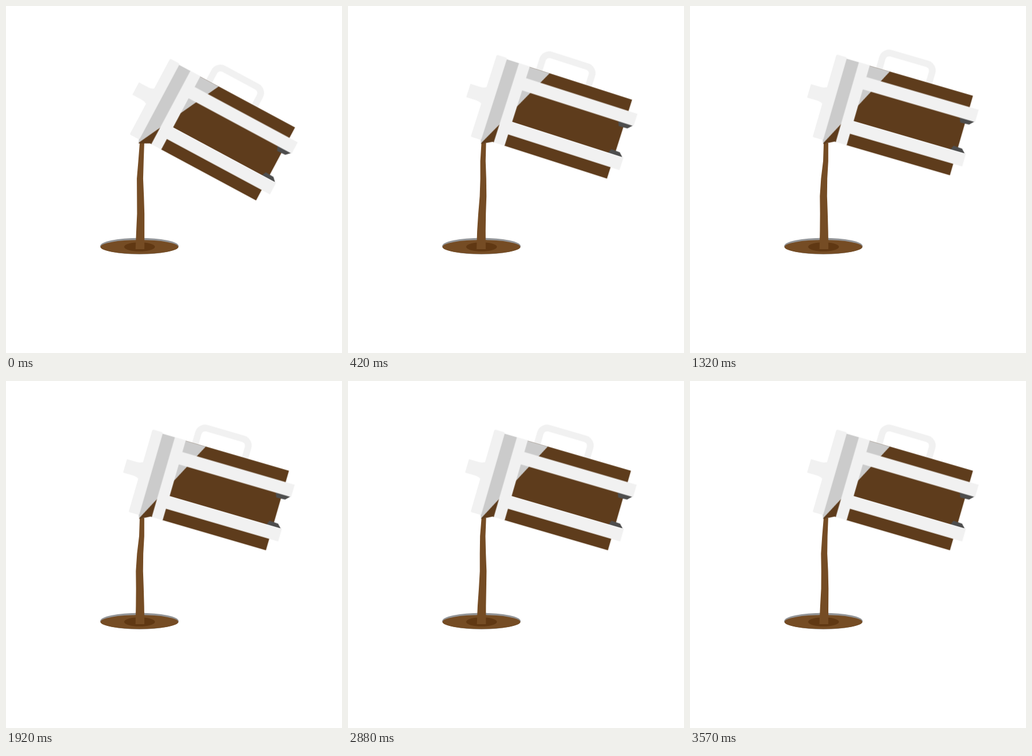
Write an HTML page without scripts that moves like this. It is 578 px wide and 595 px high and loops after 3.6 s.

```html
<!DOCTYPE html>
<html lang="en">
<head>
<meta charset="utf-8">
<title>Pouring coffee</title>
<style>
  @property --phase { syntax: '<angle>'; inherits: true; initial-value: 0deg; }

  html, body { margin: 0; width: 100%; height: 100%; overflow: hidden; background: #fff; }
  svg { display: block; width: 578px; height: 595px; }

  .light { fill: #f1f1f1; }
  .glass { fill: #cbcbcb; }
  .coffee { fill: #5e3c1c; }
  .feet { fill: #4d4d4d; }
  .handle { fill: none; stroke: #f1f1f1; stroke-width: 11.5; }

  .press { transform: translate(233px, 231px) rotate(16.2deg); animation: tilt 3.6s linear infinite; }
  @keyframes tilt {
    0% { transform: translate(233px, 231px) rotate(28.2deg); }
    13.4%, 100% { transform: translate(233px, 231px) rotate(16.2deg); }
  }

  /* A ripple runs down the stream; each height lags the one above. */
  .stream {
    --a: calc(cos(var(--phase) + 138deg) * -.3px);
    --b: calc(cos(var(--phase) + 54deg) * -1.2px);
    --c: calc(cos(var(--phase) - 27deg) * -1.6px);
    --d: calc(cos(var(--phase) - 99deg) * -1.8px);
    --e: calc(cos(var(--phase) - 156deg) * -1.7px);
    --f: calc(cos(var(--phase) - 192deg) * -1.3px);
    --g: calc(cos(var(--phase) - 216deg) * -1px);
    fill: #754c24;
    clip-path: polygon(
      calc(229.8px + var(--a)) 235px,
      calc(228.3px + var(--b)) 266px,
      calc(226.5px + var(--c)) 296px,
      calc(225px + var(--d)) 326px,
      calc(223.9px + var(--e)) 356px,
      calc(222.8px + var(--f)) 386px,
      calc(222px + var(--g)) 417px,
      calc(237.5px + var(--g) * .75) 417px,
      calc(237.2px + var(--f) * .75) 386px,
      calc(237px + var(--e) * .75) 356px,
      calc(237px + var(--d) * .75) 326px,
      calc(237px + var(--c) * .75) 296px,
      calc(237.3px + var(--b) * .75) 266px,
      calc(237.7px + var(--a) * .75) 235px);
    animation: ripple .6s linear infinite;
  }
  @keyframes ripple { from { --phase: 0deg; } to { --phase: 360deg; } }
</style>
</head>
<body>
<svg viewBox="0 0 578 595">
  <g class="cup">
    <ellipse cx="229.5" cy="411.7" rx="67.5" ry="14" fill="#939598"/>
    <ellipse cx="229.5" cy="413.2" rx="66.9" ry="12" fill="#754c24"/>
    <ellipse cx="229.7" cy="413" rx="26.5" ry="7.8" fill="#603813"/>
  </g>

  <rect class="stream" width="578" height="595"/>

  <!-- Drawn lying level, with the spout tip near the pivot. -->
  <g class="press">
    <path class="handle" d="M54.5-143V-163.5a12 12 0 0 1 12-12H131.5a12 12 0 0 1 12 12V-143"/>
    <path class="glass" d="M-5-145.3H18V-35.6L-2.3 6.4L-5 0Z"/>
    <path class="coffee" d="M18-35.6V-2.7L15.5-3L-2.3 6.4L-2 4Z"/>
    <path class="light" d="M-51-86.3H-33Q-27-86-22-90V-59Q-27-62.2-33-62.2H-51Z"/>
    <rect class="light" x="-23" y="-147.5" width="18.8" height="147.5" rx="2.5"/>

    <rect class="coffee" x="36" y="-144.8" width="186.2" height="142"/>
    <path class="glass" d="M36-144.8H73.2L36-71.3Z"/>
    <path class="feet" d="M210.7-102.5L214-94.7L229.5-95.5L238-104ZM210.7-45.5L214-53.3L229.5-52.5L238-44Z"/>
    <path class="light" d="M17.7-145.5H37.2V-2.7H17.7ZM36-124.6H238.3V-102.6H36ZM36-46H238.3V-23.2H36Z"/>
  </g>
</svg>
</body>
</html>
```
